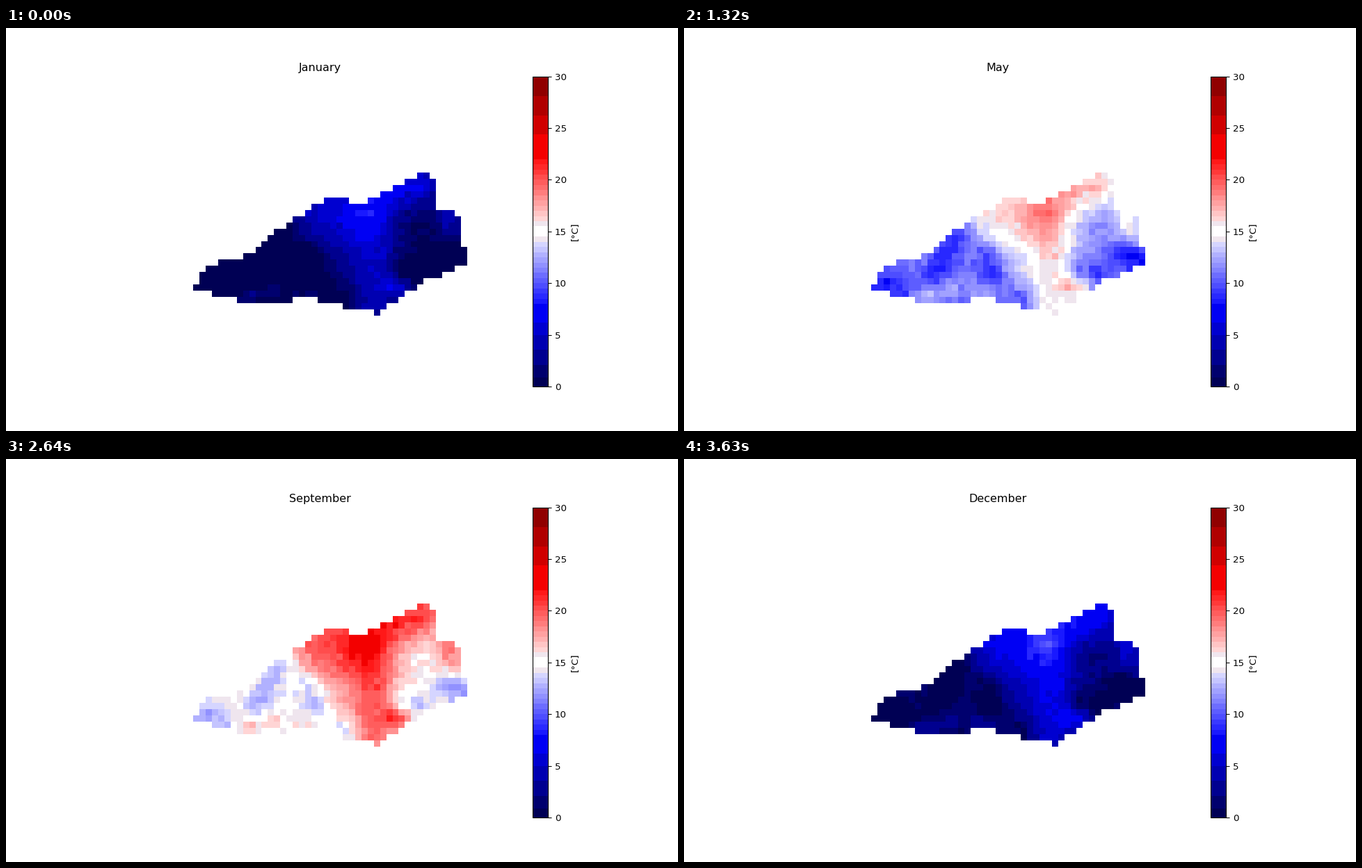
A matplotlib script that plays this animation: 966x580 px, repeating every 3.96 s.

```python
import numpy as np
import matplotlib.pyplot as plt
from matplotlib.animation import FuncAnimation
from matplotlib.colors import ListedColormap

W, H, DPI = 966, 580, 96
ROWS, COLS = 23, 44
EXTENT = (269, 663, 414, 208)

MONTHS = ["January", "February", "March", "April", "May", "June", "July",
          "August", "September", "October", "November", "December"]

# corner points (column, row) of the upper and lower border of the land
UPPER = [(0, 18), (1, 16), (2, 15.2), (4, 14.2), (7, 14), (8, 13), (9, 13),
         (12, 10), (21, 4), (24, 4), (25, 5), (27, 5), (28, 4.2), (37, -0.3),
         (38, 1), (39, 6), (41, 6), (42, 7), (43, 12)]
LOWER = [(0, 18), (2, 18), (3, 19), (6, 19), (7, 20), (15, 20), (16, 19),
         (19, 19), (20, 20), (23, 20), (24, 21), (28, 21), (29, 22), (30, 21),
         (31, 20.3), (36, 17), (37, 16), (39, 16), (40, 15.3), (43, 13.8)]

# warm valleys and cold ridges: start, end, width, degrees
RELIEF = [
    ((28.5, 4), (28, 22), 4.0, 5.1),      # main valley
    ((20, 6.5), (23.5, 6.5), 5.0, 4.6),   # northern plain
    ((34, 2), (36, 1), 3.5, 4.5),
    ((22, 12), (23, 15), 2.2, 1.2),
    ((32, 18), (33, 18), 2.0, 4.5),
    ((41, 6), (41, 9), 2.2, 3.0),
    ((8, 20), (12, 18), 2.0, 2.2),
    ((17, 18.5), (18, 18.5), 1.8, 1.7),
    ((40, 12.5), (42.5, 13.5), 2.0, -3.5),  # eastern peak
    ((33, 15.5), (36, 16), 1.8, -2.0),
    ((2, 17.5), (3, 17.5), 3.0, -2.0),
    ((10, 16), (14, 9), 2.2, -2.6),
    ((18, 12.5), (19, 16), 1.8, -2.3),
    ((24, 20), (24, 21), 1.8, -2.0),
]

col, row = np.meshgrid(np.arange(COLS), np.arange(ROWS))


def border(points):
    return np.rint(np.interp(np.arange(COLS), *zip(*points)))


def segment_distance(start, end):
    (x0, y0), (x1, y1) = start, end
    dx, dy = x1 - x0, y1 - y0
    t = np.clip(((col - x0) * dx + (row - y0) * dy) / (dx**2 + dy**2), 0, 1)
    return np.hypot(col - x0 - t * dx, row - y0 - t * dy)


def land_field():
    """Temperatures in early summer, NaN outside the land."""
    rng = np.random.default_rng(4)
    temp = 14.6 + 0.1 * (10 - row) + rng.normal(0, 0.35, col.shape)
    for start, end, width, degrees in RELIEF:
        temp += degrees * np.exp(-(segment_distance(start, end) / width) ** 2)
    land = (row >= border(UPPER)) & (row <= border(LOWER))
    return np.where(land, temp, np.nan)


def stepped_seismic():
    """Seismic map with wide steps at both ends and half degrees between."""
    edges = np.concatenate([[0, 0.9, 2.1, 3.6, 5, 6.2],
                            np.arange(8, 22.1, 0.5),
                            [24.4, 26.2, 28.1, 30]])
    mids = (edges[:-1] + edges[1:]) / 2
    colors = plt.get_cmap("seismic")(mids / 30)
    colors[abs(mids - 15) < 1, :3] = 0.94, 0.9, 0.935
    colors[abs(mids - 15) < 0.5, :3] = 1
    samples = np.arange(300) / 10 + 0.05
    return ListedColormap(colors[np.digitize(samples, edges) - 1])


field = land_field()


def temperature(month):
    level = (9.5 + 8.8 * np.cos(np.pi * (month - 6.35) / 6)
             + 0.7 * np.sin(np.pi * month / 3))
    return np.clip(level + 0.98 * (field - 15), 0, 30)


plt.rcParams["font.family"] = "DejaVu Sans"
fig = plt.figure(figsize=(W / DPI, H / DPI), dpi=DPI, facecolor="white")
ax = fig.add_axes([0, 0, 1, 1])
img = ax.imshow(temperature(0), cmap=stepped_seismic(), vmin=0, vmax=30,
                extent=EXTENT, aspect="auto", interpolation="nearest")
ax.set(xlim=(0, W), ylim=(H, 0))
ax.axis("off")
title = ax.text(451, 61.6, MONTHS[0], fontsize=12, ha="center", va="baseline")

cax = fig.add_axes([757.1 / W, 0.11, 22.3 / W, 0.77])
fig.colorbar(img, cax=cax, label="[°C]", ticks=range(0, 31, 5))


def draw(month):
    img.set_data(temperature(month))
    title.set_text(MONTHS[month])
    return img, title


anim = FuncAnimation(fig, draw, frames=len(MONTHS), interval=330, repeat=True)
plt.show()
```
